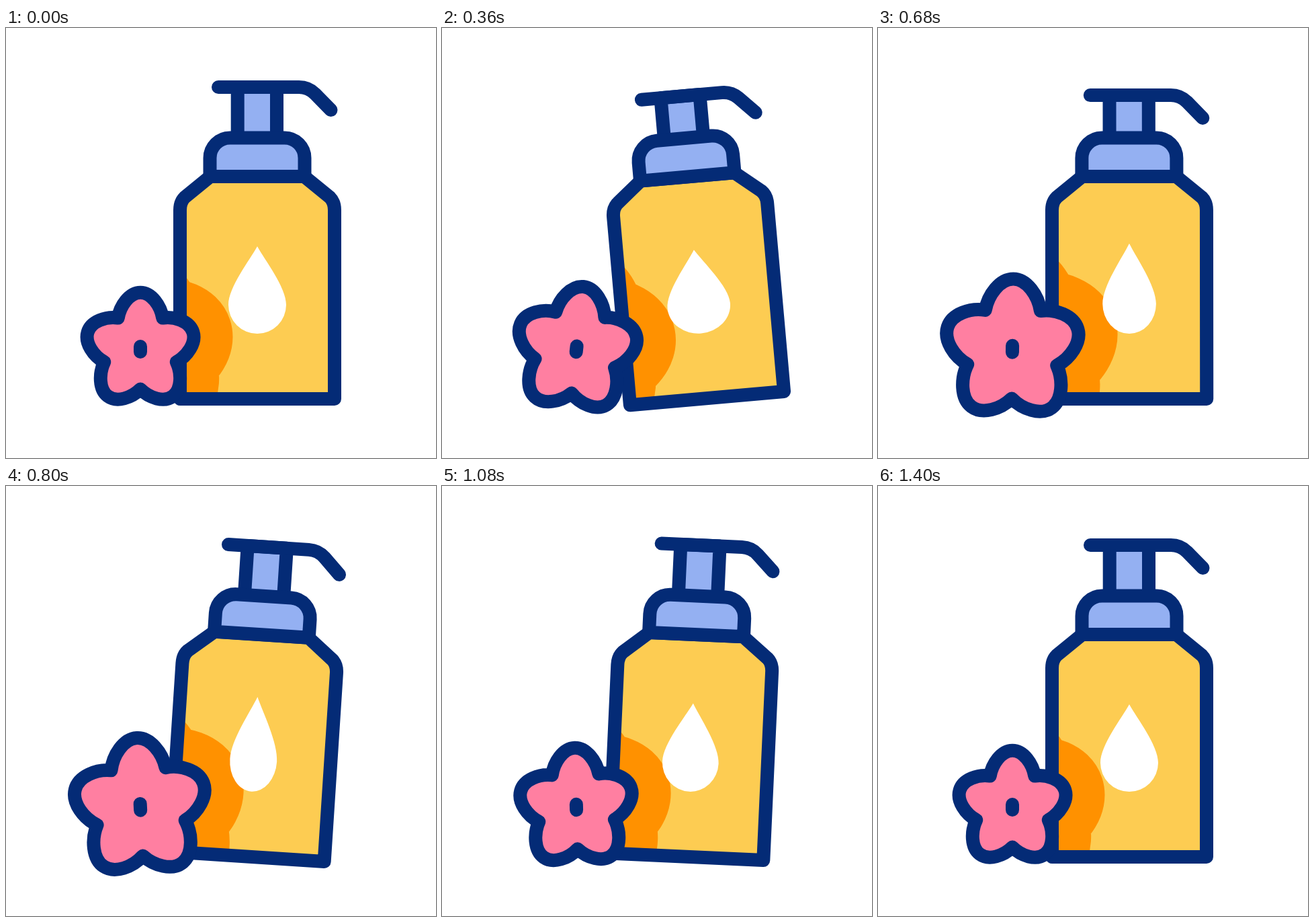
Write an HTML page that moves like this. It is 640 by 640 pixels and loops after 1.48 s.

```html
<!DOCTYPE html>
<html lang="en">
<head>
<meta charset="utf-8">
<title>Lotion bottle</title>
<style>
  html, body { margin: 0; width: 100%; height: 100%; overflow: hidden; background: #fff; }
  svg { display: block; width: 100%; height: 100%; }
  .line { fill: none; stroke: #042b76; stroke-width: 20; stroke-linecap: round; stroke-linejoin: round; }
  .blue { fill: #94b0f2; }
  .pink { fill: #ff7fa1; }
  .shade { fill: #ff9100; stroke: #ff9100; stroke-width: 116; stroke-linejoin: round; }
  .fixed { vector-effect: non-scaling-stroke; }
</style>
</head>
<body>
<svg viewBox="0 0 640 640">
  <defs>
    <path id="body" d="M304 221H444L482 252Q489 259 489 271V552H259V271Q259 259 266 252Z"/>
    <clipPath id="inside"><use href="#body"/></clipPath>
  </defs>
  <g id="bottle">
    <g id="pump" class="line">
      <path class="blue" d="M344.7 163V88H403V163"/>
      <path d="M316 88H436Q450 88 460 98L483.5 122"/>
    </g>
    <use href="#body" fill="#fdcc52"/>
    <g clip-path="url(#inside)">
      <g id="level"><path id="shade" class="fixed shade"/></g>
    </g>
    <path id="drop" fill="#fff" d="M374 325C363 345 331 386 331 412A43 43 0 0 0 417 412C417 386 385 345 374 325Z"/>
    <use href="#body" class="line"/>
    <path class="line blue" d="M303.5 221V193.5a30 30 0 0 1 30-30H414.5a30 30 0 0 1 30 30V221Z"/>
  </g>
  <g id="flower">
    <path id="petals" class="fixed line pink"/>
    <path class="fixed line" d="M0 -5V3"/>
  </g>
</svg>
<script>
  const LOOP = 1480, STEP = 40, LAST = 1400;
  const $ = id => document.getElementById(id);
  const move = (id, value) => $(id).setAttribute('transform', value);

  // Five equal petals, each a mirrored curve from notch to tip to notch
  function flowerPath() {
    const at = (r, deg) => {
      const a = deg * Math.PI / 180;
      return `${.975 * r * Math.sin(a)} ${-1.01 * r * Math.cos(a)} `;
    };
    let d = 'M' + at(58, -36);
    for (let a = 0; a < 360; a += 72) {
      d += 'C' + at(72, a - 25.5) + at(86, a - 11.3) + at(84.5, a);
      d += 'S' + at(72, a + 25.5) + at(58, a + 36);
    }
    return d + 'Z';
  }

  function draw(t) {
    // Eased 0 to 1 between two times
    const ramp = (from, to) => {
      const s = Math.min(Math.max((t - from) / (to - from), 0), 1);
      return s * s * (3 - 2 * s);
    };
    const tilt = -6 * ramp(0, 480) + 10 * ramp(480, 835) - 4 * ramp(870, 1400);
    const press = 18 * (ramp(0, 560) - ramp(560, 870));
    const widen = .14 * ramp(200, 470) - .33 * ramp(470, 820) + .19 * ramp(820, 1160);
    const grow = 1 + .236 * (ramp(120, 630) - ramp(720, 1225));
    const turn = 7.7 * ramp(0, 490) - 10.7 * ramp(490, 807) + 3 * ramp(807, LAST);

    const bloom = `translate(200 479) rotate(${turn}) scale(${grow})`;
    move('bottle', `rotate(${tilt} 374 320)`);
    move('level', `rotate(${-tilt} 374 320)`);
    move('pump', `translate(0 ${press})`);
    move('drop', `translate(374 455) scale(${1 + widen} ${1 - widen * .45}) translate(-374 -455)`);
    move('shade', bloom);
    move('flower', bloom);
  }

  function tick() {
    const t = performance.now() % LOOP;
    draw(Math.min(Math.floor(t / STEP) * STEP, LAST));
    requestAnimationFrame(tick);
  }

  for (const id of ['shade', 'petals']) $(id).setAttribute('d', flowerPath());
  tick();
</script>
</body>
</html>
```
